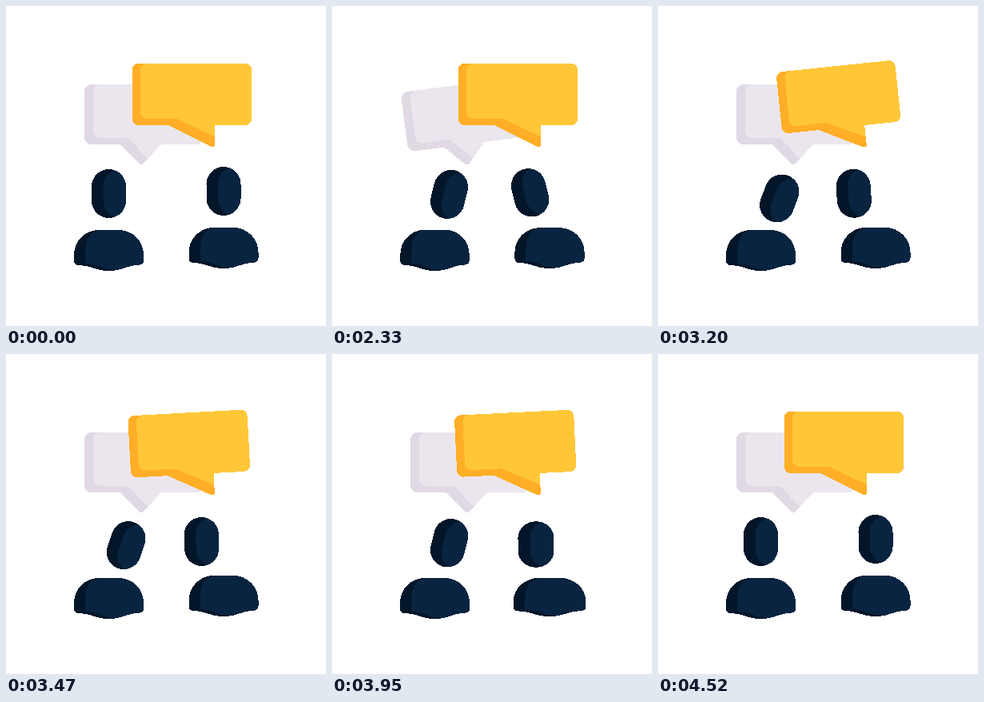
Animation of 400 by 400 pixels, one loop 4550 ms. Source, as an HTML page:

```html
<!DOCTYPE html>
<html lang="en">
<head>
<meta charset="utf-8">
<title>Two people talking</title>
<style>
  html, body { margin: 0; width: 100%; height: 100%; overflow: hidden; background: #fff; }
  svg { display: block; width: 100%; height: 100%; shape-rendering: crispEdges; }
  .shade { fill: #031629; }
  .skin { fill: #082440; }
</style>
</head>
<body>
<svg viewBox="0 0 400 400" xmlns="http://www.w3.org/2000/svg">
  <defs>
    <g id="head">
      <rect class="shade" x="-21.5" y="-30.5" width="43" height="61" rx="21.5"/>
      <path class="skin" d="M7-29.3A21.5 21.5 0 0 1 21.5-9V9A21.5 21.5 0 0 1 7 29.3A21.5 21.5 0 0 1-7 9V-9A21.5 21.5 0 0 1 7-29.3Z"/>
    </g>
    <!-- origin: middle of the lower edge -->
    <g id="body">
      <path class="shade" d="M-43.5-13V-20A31 31 0 0 1-12.5-51H12.5A31 31 0 0 1 43.5-20V-13Q43.5-8 38.5-7.5C21-6.5 17 0 0 0C-17 0-21-6.500-38.5-7Q-43.5-7.5-43.5-13Z"/>
      <path class="skin" d="M-29.5-9V-22Q-29.5-47-12.5-51H12.5A31 31 0 0 1 43.5-20V-13Q43.5-8 38.5-7.5C24-6.7 19-2.500 9-.7C-9-1.500-11-8.500-29.5-9Z"/>
    </g>
  </defs>
  <g id="grey">
    <path fill="#e0d9e4" d="M107 98H238A9 9 0 0 1 247 107V164A9 9 0 0 1 238 173H194L172 197Q169 200 166 197L143 173H107A9 9 0 0 1 98 164V107A9 9 0 0 1 107 98Z"/>
    <path fill="#ebe6ed" d="M117 98H238A9 9 0 0 1 247 107V164A9 9 0 0 1 238 173H194L177.5 191L152 164.5H117A8 8 0 0 1 109 156.5V107Q109 99 117 98Z"/>
  </g>
  <g id="gold">
    <path fill="#ffae26" d="M166 71.700H299A8 8 0 0 1 307 80V141A8 8 0 0 1 299 149H261V174Q261 177 256.5 176L203.500 149H166A8 8 0 0 1 157.700 141V80A8 8 0 0 1 166 71.700Z"/>
    <path fill="#ffc738" d="M177 71.700H299A8 8 0 0 1 307 80V141A8 8 0 0 1 299 149H261V163.5L214 141H176A8 8 0 0 1 168 133V81Q168 73 177 71.700Z"/>
  </g>
  <use id="bodyL" href="#body"/>
  <use id="bodyR" href="#body"/>
  <use id="headL" href="#head"/>
  <use id="headR" href="#head"/>
</svg>
<script>
const LOOP = 4550, HOLD = 2030, STEP = 30, MOVE = 10;
const $ = id => document.getElementById(id);
const set = (el, value) => el.setAttribute('transform', value);

// Smooth rise from 0 to 1 that starts at `from` and lasts `len` steps.
function ease(n, from, len) {
  const u = Math.min(1, Math.max(0, (n - from) / len));
  return u * u * (3 - 2 * u);
}

// Swing to and fro, each stroke 5 degrees weaker than the last.
function swing(n, start, gap) {
  let angle = 0, last = 0;
  for (let k = 0; k < 5; k++) {
    const peak = (k % 2 ? 1 : -1) * (20 - 5 * k);
    angle += (peak - last) * ease(n, start + gap * k, gap);
    last = peak;
  }
  return angle;
}

// Squash while moving, then a small stretch that settles.
const press = (n, s) =>
  ease(n, s, 5) - 1.2 * ease(n, s + 5, 5) + 0.2 * ease(n, s + 10, 5);

// lean and nod are offsets [x, y, tilt] of the head.
const people = [
  {
    head: $('headL'), body: $('bodyL'), x: 128.5, y: 234.5, floor: 331,
    go: -1.6, back: 66.6, lean: [18, 1.7, 14],
    nod: [5.5, 4.5, 7], nodAt: n => ease(n, 19, 23) - ease(n, 42, 15)
  },
  {
    head: $('headR'), body: $('bodyR'), x: 272, y: 231.5, floor: 328,
    go: 1.5, back: 59.8, lean: [-26, 1.6, -15],
    nod: [-1.5, 1.4, 14], nodAt: n => ease(n, 26, 18) - ease(n, 59.8, MOVE)
  }
];

function pose(p, n) {
  const lean = ease(n, p.go, MOVE) - ease(n, p.back, MOVE);
  const nod = p.nodAt(n);
  const [dx, dy, tilt] = p.lean.map((v, i) => v * lean + p.nod[i] * nod);
  const k = press(n, p.go) + press(n, p.back);
  const scale = `scale(${1 + 0.045 * k} ${1 - 0.06 * k})`;
  set(p.body, `translate(${p.x} ${p.floor}) ${scale}`);
  set(p.head, `translate(${p.x + dx} ${p.y + dy + 5 * k}) rotate(${tilt}) ${scale}`);
}

function draw(time) {
  const t = time % LOOP;
  const n = t < HOLD ? -MOVE : Math.floor((t - HOLD) / STEP);
  set($('grey'), `rotate(${swing(n, -1.1, 7.9)} 169 198)`);
  set($('gold'), `rotate(${swing(n, 36.1, 8)} 260 176)`);
  for (const p of people) pose(p, n);
}

let begin;
function tick(now) {
  begin ??= now;
  draw(now - begin);
  requestAnimationFrame(tick);
}
draw(0);
requestAnimationFrame(tick);
</script>
</body>
</html>
```
